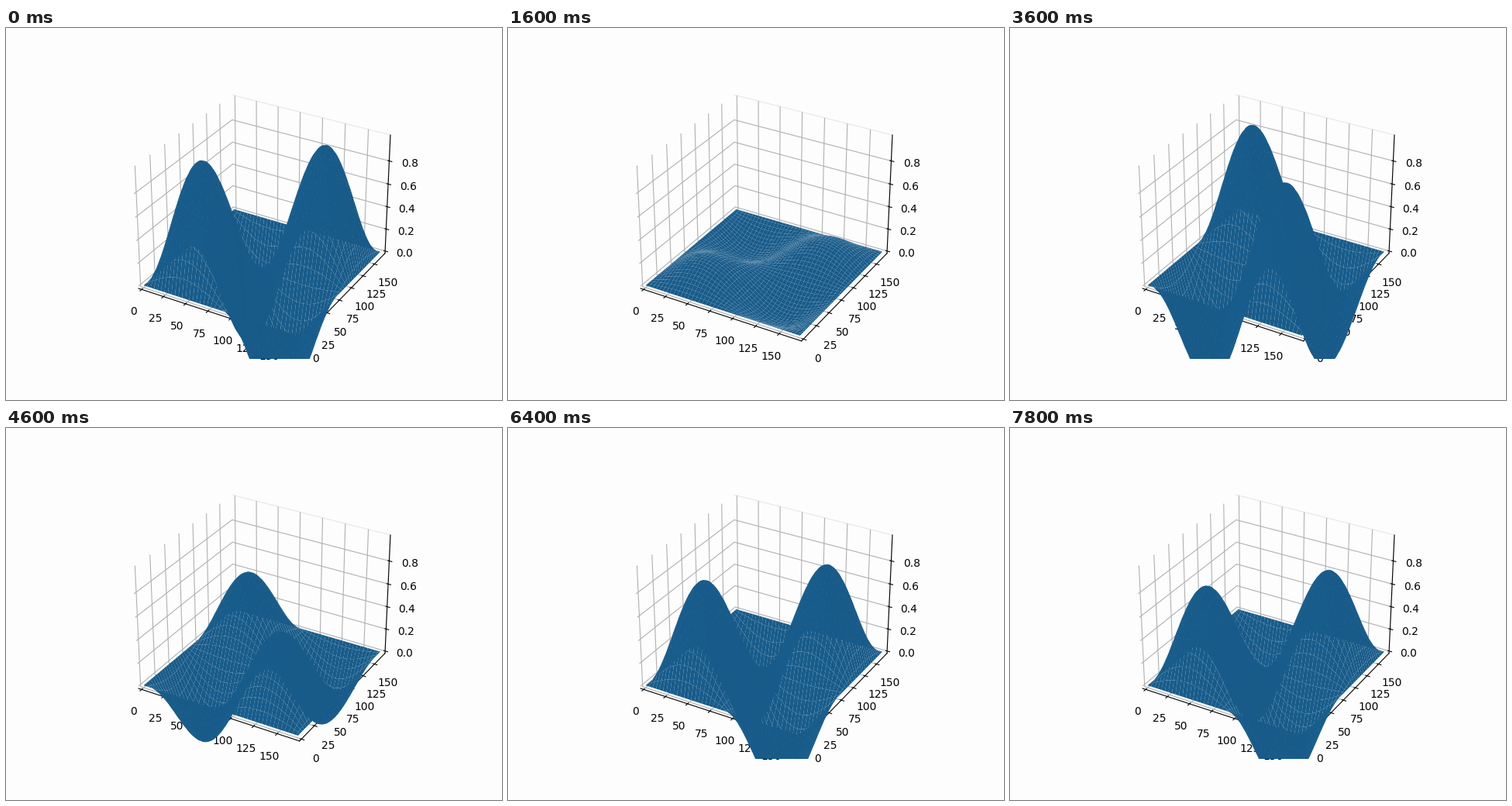
Write a matplotlib script that moves like this. It is 640 by 480 pixels and loops after 8 s.

```python
import numpy as np
import matplotlib.pyplot as plt
from matplotlib.animation import FuncAnimation

SPAN = 170
FRAMES = 40
INTERVAL = 200
OMEGA = 0.895      # rad per second
PHASE = -0.03
BLUE = "#1f77b4"
PAPER = "#fdfdfd"
MARGIN = 1 / 48

steps = np.arange(SPAN + 1)
X, Y = np.meshgrid(steps, steps)
wave = np.sin(2 * np.pi * steps / SPAN)
mode = np.outer(wave, wave)

fig = plt.figure(figsize=(6.4, 4.8), dpi=100, facecolor=PAPER)
ax = fig.add_subplot(projection="3d", facecolor=PAPER)
ax.set_xlim(0, SPAN, view_margin=MARGIN)
ax.set_ylim(0, SPAN, view_margin=MARGIN)
ax.set_zlim(0, mode.max(), view_margin=MARGIN)
ax.set_xticks(range(0, 151, 25))
ax.set_yticks(range(0, 151, 25))
ax.set_zticks([0, 0.2, 0.4, 0.6, 0.8])

for axis, edge in ((ax.xaxis, PAPER), (ax.yaxis, "#ebebeb"), (ax.zaxis, PAPER)):
    axis.pane.set(facecolor=PAPER, edgecolor=edge, alpha=1)

surface = None


def draw(frame):
    """Show the standing wave at the given step."""
    global surface
    if surface is not None:
        surface.remove()
    height = np.cos(OMEGA * frame * INTERVAL / 1000 + PHASE)
    surface = ax.plot_surface(X, Y, height * mode, color=BLUE)
    return [surface]


anim = FuncAnimation(fig, draw, frames=FRAMES, interval=INTERVAL,
                     init_func=lambda: [], repeat=True, blit=False)
plt.show()
```
